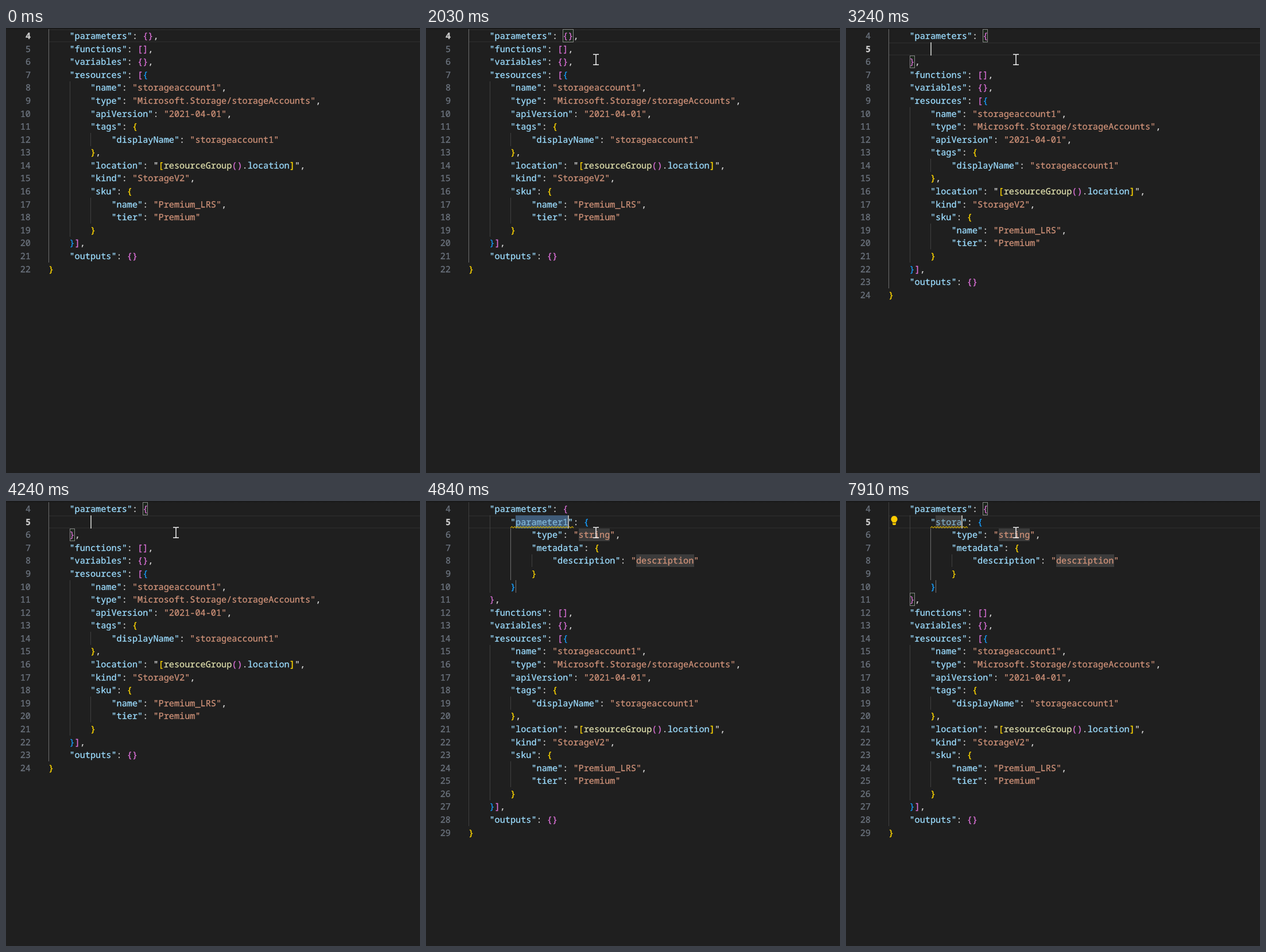
An HTML page that plays this animation: 721 px wide and 776 px high, repeating every 8000 ms.

```html
<!DOCTYPE html>
<html lang="en">
<head>
<meta charset="utf-8">
<title>Template editor</title>
<style>
  html, body { margin: 0; width: 100%; height: 100%; overflow: hidden; background: #1f1f1f; }
  #stage {
    position: relative; width: 721px; height: 776px; overflow: hidden;
    background: #1f1f1f; color: #d4d4d4;
    font: 15.21px/22.58px "Noto Sans Mono", monospace;
    font-variant-ligatures: none; text-rendering: geometricPrecision;
    -webkit-text-stroke: .3px currentColor;
  }
  #stage div, #stage svg { position: absolute; box-sizing: border-box; white-space: pre; overflow: visible; }
  .shade { left: 0; top: 0; width: 721px; height: 3px; background: linear-gradient(#161616, #1f1f1f); }
  .num { left: 0; width: 43px; text-align: right; color: #6e7681; }
  .num.on { color: #ccc; font-weight: 600; }
  .line { border: solid #282828; border-width: 2px 0; }
  .guide { border-left: 1px solid #404040; }
  .guide.on { border-color: #707070; }
  .match { border: 1px solid #888; background: rgba(0, 100, 0, .1); }
  .select { background: #264f78; }
  .field { background: rgba(124, 124, 124, .3); }
  .final { border-left: 1px solid #777; }
  .caret { background: #aeafad; }
  .key { color: #9cdcfe; }
  .str { color: #ce9178; }
  .fn { color: #dcdcaa; }
  .dim { opacity: .7; }
  .b0 { color: #ffd700; }
  .b1 { color: #da70d6; }
  .b2 { color: #179fff; }
  .popup {
    left: 147px; top: 47px; width: 514px; height: 27px; line-height: 25px;
    background: #2c2c2d; border: 1px solid #454545; box-shadow: 0 1px 5px rgba(0, 0, 0, .36);
  }
  .label, .detail { top: 0; }
  .label { left: 27px; color: #fff; font-weight: 600; }
  .detail { left: 168px; color: #c5c5c5; font-size: 13px; }
</style>
</head>
<body>
<div id="stage"></div>
<script>
const LOOP = 8000, LEFT = 74, TOP = 2.4, CHAR = 9.13, ROW = 22.58, TEXT_DROP = 0.7;
const stage = document.getElementById('stage');

const RESOURCES = `    "functions": [],
    "variables": {},
    "resources": [{
        "name": "storageaccount1",
        "type": "Microsoft.Storage/storageAccounts",
        "apiVersion": "2021-04-01",
        "tags": {
            "displayName": "storageaccount1"
        },
        "location": "[resourceGroup().location]",
        "kind": "StorageV2",
        "sku": {
            "name": "Premium_LRS",
            "tier": "Premium"
        }
    }],
    "outputs": {}
}`;

const parameter = name => `        "${name}": {
            "type": "string",
            "metadata": {
                "description": "description"
            }
        }`;

const CARET_FLIPS = [1490, 2030, 2490, 2970, 3240, 3710, 4240, 4710, 4840, 5310, 5790, 6250, 6780];
const NAMES = [[4840, 'parameter1'], [7180, 's'], [7290, 'st'], [7400, 'sto'], [7780, 'stor'], [7910, 'stora']];
const MOUSE = [
  [130, 712, 752], [340, 560, 480], [550, 300, 150], [690, 230, 50], [900, 246, 23],
  [1219, 246, 23], [1220, 246, 20], [1489, 246, 20], [1490, 236, 20], [1620, 247, 20],
  [1889, 247, 20], [1890, 256, 26], [2030, 295, 55]
];

const span = (cls, text) => `<span class="${cls}">${text}</span>`;
const css = (x, y, w, h) => `style="left:${x}px;top:${y}px;width:${w}px;height:${h}px"`;
const box = (cls, col, row, cols, rows = 1) =>
  `<div class="${cls}" ${css(LEFT + col * CHAR, TOP + row * ROW, cols * CHAR, rows * ROW)}></div>`;
const guide = (col, from, to, on) => box('guide' + (on ? ' on' : ''), col, from, 1, to - from + 1);

// Colours JSON tokens; brackets cycle through three colours by depth.
function highlight(code, name) {
  let depth = 1;
  return code.replace(/"\[(\w+)\(\)\.(\w+)\]"|"([^"]*)"(:?)|[[{]|[\]}]/g, (tok, fn, prop, text, colon) => {
    if (fn) return '"' + span('b0', '[') + span('fn', fn) + span('b1', '()') + '.' + span('key', prop) + span('b0', ']') + '"';
    if (text !== undefined) {
      if (!colon) return span('str', tok);
      return span('key', '"' + (text === name ? span('dim', text) : text) + '"') + ':';
    }
    return '[{'.includes(tok) ? span('b' + depth++ % 3, tok) : span('b' + --depth % 3, tok);
  });
}

function squiggle(col, row, cols) {
  const waves = Math.round(cols * CHAR / 5);
  return `<svg ${css(LEFT + col * CHAR, TOP + (row + 1) * ROW - 3.5, cols * CHAR, 4)}>` +
    `<path d="M0 3${'l2.5 -2.5l2.5 2.5'.repeat(waves)}" fill="none" stroke="#cca700" stroke-width="1.1"/></svg>`;
}

const POPUP = `<div class="popup">
<svg ${css(6, 4, 16, 17)}><path d="M1 15V1H15V15" fill="none" stroke="#fff" stroke-width="1.4"/>
<path d="M1 15.5H16" stroke="#fff" stroke-width="1.6" stroke-dasharray="2 1.5"/></svg>
<div class="label">new-paramet…</div><div class="detail">ARM Template Parameter Definition (Norv…</div>
<svg ${css(486, 6, 8, 12)}><path d="M1 1L6 6L1 11" fill="none" stroke="#ddd" stroke-width="1.5"/></svg></div>`;

const BULB = `<svg ${css(78, 26, 12, 16)}><path d="M6 0a5.6 5.6 0 0 1 3.4 10V11.5H2.6V10A5.6 5.6 0 0 1 6 0Z
M3 12.5H9V14a2 2 0 0 1-2 2H5a2 2 0 0 1-2-2Z" fill="#fc0"/></svg>`;

// Pointer samples arrive every 70 ms while it travels.
function pointer(t) {
  if (t < MOUSE[0][0]) return '';
  const i = MOUSE.findLastIndex(p => p[0] <= t);
  const a = MOUSE[i], b = MOUSE[i + 1] || a;
  const k = b === a ? 0 : Math.floor((t - a[0]) / 70) * 70 / (b[0] - a[0]);
  const x = a[1] + (b[1] - a[1]) * k, y = a[2] + (b[2] - a[2]) * k;
  return `<svg ${css(Math.round(x) - 5.5, Math.round(y) - 10, 12, 20)}>
<path d="M1 1H4.5Q6 1 6 2.5Q6 1 7.5 1H11M6 2V18M1 19H4.5Q6 19 6 17.5Q6 19 7.5 19H11" fill="none" stroke="#f4f4f4" stroke-width="1.5"/></svg>`;
}

function scene(t) {
  const name = (NAMES.findLast(n => n[0] <= t) || [])[1];
  const open = t >= 3240, typed = t >= 7180;
  const head = '    "parameters": {';
  const code = (name ? `${head}\n${parameter(name)}\n    },` : open ? `${head}\n\n    },` : head + '},') + '\n' + RESOURCES;
  const lines = code.split('\n');
  const active = open ? 1 : 0;
  const res = lines.findIndex(l => l.includes('"resources"'));
  const out = ['<div class="shade"></div>', box('line', 0, active, 71)];

  if (name) {
    if (!typed) out.push(box('select', 9, 1, name.length));
    out.push(box('field', 9, 1, name.length), box('field', 21, 2, 6), box('field', 32, 4, 11), box('final', 9, 6, 1));
    out.push(guide(4, 1, 6), guide(8, 2, 5, true), guide(12, 4, 4));
  }
  out.push(guide(0, 0, lines.length - 2, !name), guide(4, res + 1, res + 12),
    guide(8, res + 5, res + 5), guide(8, res + 10, res + 11));

  if (t >= 1490 && !open) out.push(box('match', 18, 0, 2));
  if (open && (!name || typed)) out.push(box('match', 18, 0, 1), box('match', 4, name ? 7 : 2, 1));

  highlight(code, name).split('\n').forEach((line, i) => {
    const y = `top:${TOP + TEXT_DROP + i * ROW}px`;
    out.push(`<div class="num${i === active ? ' on' : ''}" style="${y}">${i + 4}</div>`,
      `<div style="left:${LEFT}px;${y}">${line}</div>`);
  });

  if (name) out.push(squiggle(8, 1, name.length + 2));
  if (t >= 5240) out.push(BULB);
  if (CARET_FLIPS.filter(f => f <= t).length % 2) {
    const col = name ? 9 + name.length : open ? 8 : 19;
    out.push(`<div class="caret" ${css(Math.floor(LEFT + col * CHAR), TOP + active * ROW, 2, ROW)}></div>`);
  }
  if (t >= 4310 && t < 4840) out.push(POPUP);
  return out.join('') + pointer(t);
}

let start, shown;
function tick(now) {
  start ??= now;
  const html = scene((now - start) % LOOP);
  if (html !== shown) stage.innerHTML = shown = html;
  requestAnimationFrame(tick);
}
stage.innerHTML = shown = scene(0);
requestAnimationFrame(tick);
</script>
</body>
</html>
```
